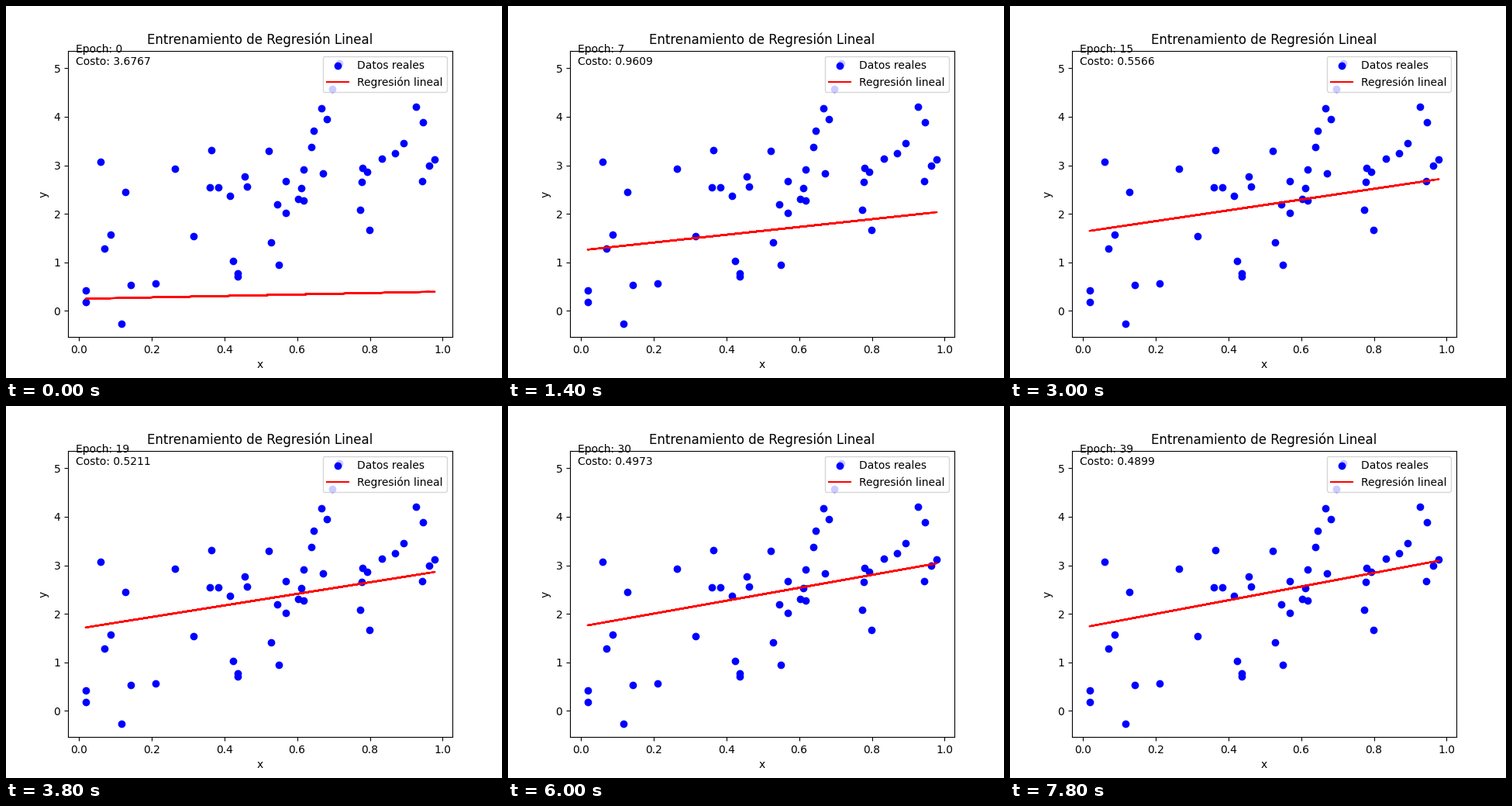
A matplotlib script for the animation above (8 s loop, 640 by 480 pixels).

```python
import matplotlib.pyplot as plt
import numpy as np
from matplotlib.animation import FuncAnimation

EPOCHS = 40
RATE = 0.1
POINTS = 50

np.random.seed(0)
x = np.random.rand(POINTS)
y = 1 + 3 * x + np.random.randn(POINTS)


def train():
    """Gradient descent: one (intercept, slope, cost) per epoch."""
    design = np.column_stack([np.ones(POINTS), x])
    theta = np.zeros(2)
    history = []
    for _ in range(EPOCHS):
        error = design @ theta - y
        cost = np.mean(error ** 2) / 2
        theta = theta - RATE * design.T @ error / POINTS
        history.append((*theta, cost))
    return history


history = train()

fig, ax = plt.subplots(figsize=(6.4, 4.8), dpi=100)
ax.scatter(x, y, color="blue", label="Datos reales")
line, = ax.plot([], [], color="red", label="Regresión lineal")
info = ax.text(0.02, 0.95, "", transform=ax.transAxes)
ax.set_title("Entrenamiento de Regresión Lineal")
ax.set_xlabel("x")
ax.set_ylabel("y")
ax.legend(loc="upper right")


def update(epoch):
    intercept, slope, cost = history[epoch]
    line.set_data(x, intercept + slope * x)
    info.set_text(f"Epoch: {epoch}\nCosto: {cost:.4f}")
    return line, info


anim = FuncAnimation(fig, update, frames=EPOCHS, interval=200,
                     repeat=True, repeat_delay=0)
plt.show()
```
